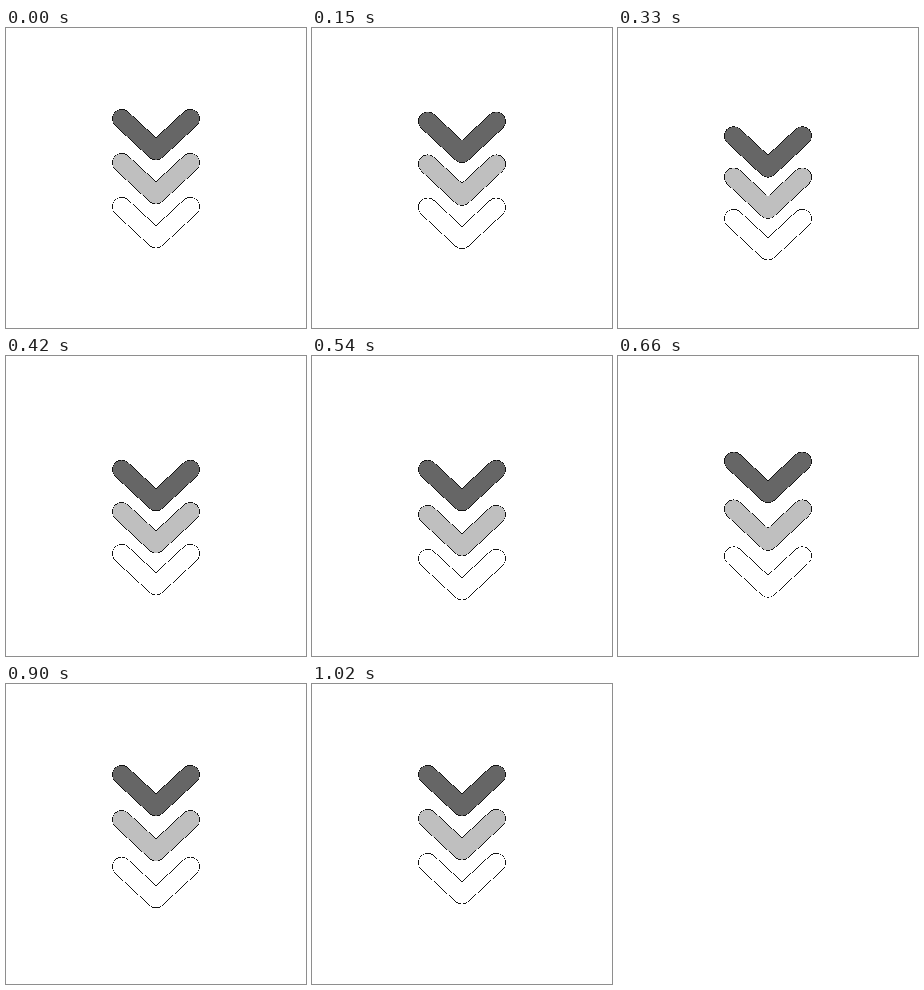
These frames come from a looping animation (300 by 300 pixels, 1.05 s). An HTML page:

```html
<!DOCTYPE html>
<html lang="en">
<head>
<meta charset="utf-8">
<title>Scroll down arrows</title>
<style>
  html, body { margin: 0; width: 100%; height: 100%; overflow: hidden; background: #fff; }
  svg { display: block; width: 100vw; height: 100vh; }
  path { fill: none; stroke-linecap: round; stroke-linejoin: round; shape-rendering: crispEdges; }
</style>
</head>
<body>
<svg id="stage" viewBox="0 0 300 300"></svg>
<script>
const LOOP = 1050, STEP = 30, DROP = 24;
const SHAPE = 'M115.7 0L150 32L184.3 0';
const OUTLINE = 19.4, INNER = 18.1;

// Each arrow starts a little later and moves a little slower than the one above.
const arrows = ['#666', '#bfbfbf', '#fff'].map((color, i) => ({
  color,
  y: 90.7 + 44 * i,
  start: 60 + 20 * i,
  half: 420 + 20 * i
}));

const stage = document.getElementById('stage');

function add(parent, tag, attrs = {}) {
  const el = document.createElementNS('http://www.w3.org/2000/svg', tag);
  for (const key in attrs) el.setAttribute(key, attrs[key]);
  return parent.appendChild(el);
}

for (const arrow of arrows) {
  arrow.el = add(stage, 'g');
  add(arrow.el, 'path', { d: SHAPE, stroke: '#111', 'stroke-width': OUTLINE });
  add(arrow.el, 'path', { d: SHAPE, stroke: arrow.color, 'stroke-width': INNER });
}

// Down and back up once along a cosine
function offset(time, { start, half }) {
  const phase = Math.min(2, Math.max(0, (time - start) / half));
  return DROP * (1 - Math.cos(Math.PI * phase)) / 2;
}

function draw(now) {
  const time = Math.floor((now % LOOP) / STEP) * STEP;
  for (const arrow of arrows) {
    const y = arrow.y + offset(time, arrow);
    arrow.el.setAttribute('transform', `translate(0 ${y.toFixed(2)})`);
  }
}

const begin = performance.now();
function tick() {
  draw(performance.now() - begin);
  requestAnimationFrame(tick);
}
tick();
</script>
</body>
</html>
```
